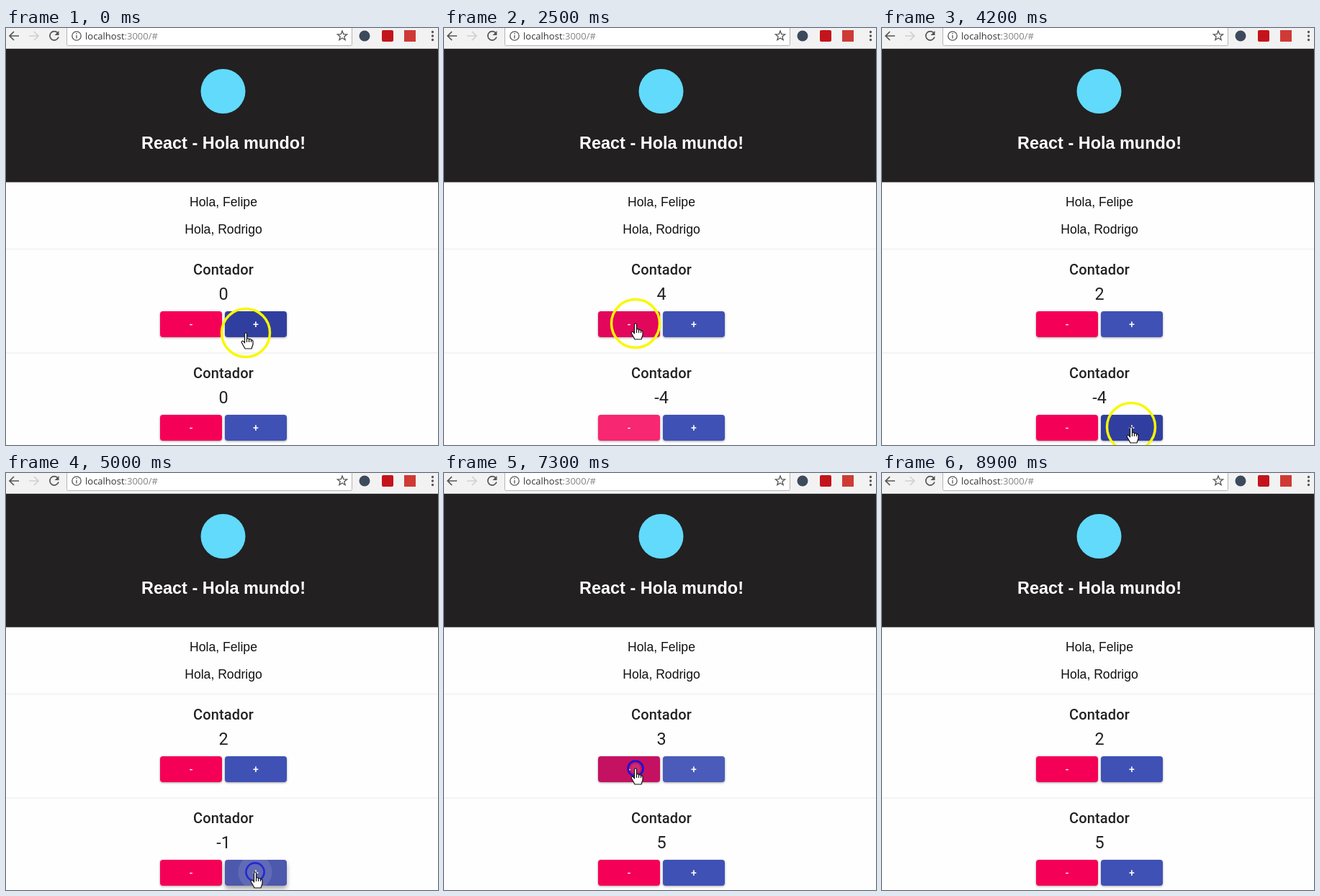
An HTML page for the animation above (9000 ms loop, 600 by 580 pixels).

```html
<!DOCTYPE html>
<html lang="es">
<head>
<meta charset="utf-8">
<title>Contador</title>
<style>
  html, body { margin: 0; width: 100%; height: 100%; overflow: hidden; background: #fefefe; }
  svg { display: block; }
  .mid { text-anchor: middle; }
  .url { font: 13px "Open Sans", sans-serif; fill: #333; }
  .title { font: bold 23.45px "Liberation Sans", Arial, sans-serif; fill: #fff; }
  .hello { font: 17.6px "Liberation Sans", Arial, sans-serif; fill: #111; }
  .name { font: 500 20px Roboto, sans-serif; letter-spacing: .15px; fill: #222; }
  .count { font: 23.4px Roboto, sans-serif; fill: #222; }
  .sign { font: 500 14px Roboto, sans-serif; fill: #fff; }
  .line { fill: none; stroke: #555; stroke-width: 1.7; }
  .thin { stroke-width: 1.3; }
</style>
</head>
<body>
<svg width="600" height="580" viewBox="0 0 600 580">
  <rect width="600" height="29" fill="#f2f2f2"/>
  <rect x="84.5" y="-4" width="396" height="28.5" rx="2" fill="#fff" stroke="#b5b5b5"/>
  <path d="M0 28.5H600" stroke="#ccc"/>
  <path class="line" d="M18 11H5M11 5L5 11L11 17"/>
  <path class="line" d="M32 11H45M39 5L45 11L39 17" style="stroke:#d0d0d0"/>
  <path class="line" d="M72 7A6.2 6.2 0 1 0 73 12.5"/>
  <path d="M73.5 4V10H67.5Z" fill="#555"/>
  <circle class="line thin" cx="98" cy="11" r="6.2"/>
  <path class="line thin" d="M98 10V14.5M98 7V8.5"/>
  <polygon class="line thin" id="star"/>
  <text class="url" x="110" y="15.5">localhost<tspan fill="#858585">:3000/#</tspan></text>
  <circle cx="498" cy="11" r="7.5" fill="#3d4a5c"/>
  <rect x="522" y="3" width="16" height="16" rx="2" fill="#c4141b"/>
  <rect x="553" y="3" width="16" height="16" fill="#cf3a35"/>
  <path d="M592.5 5.5V17" stroke="#555" stroke-width="3.4" stroke-linecap="round" stroke-dasharray="0 5.5"/>

  <rect y="29" width="600" height="185.5" fill="#222021"/>
  <circle cx="301.5" cy="88" r="31" fill="#61dafb"/>
  <text class="title mid" x="302" y="168">React - Hola mundo!</text>
  <text class="hello mid" x="302" y="248">Hola, Felipe</text>
  <text class="hello mid" x="302" y="286">Hola, Rodrigo</text>
  <path d="M0 307.5H600M0 452H600" stroke="#f4f4f6" stroke-width="2"/>

  <g id="counters"></g>

  <g id="pointer">
    <circle id="ring" fill="none"/>
    <g stroke="#111" stroke-width="1.2" stroke-linejoin="round">
      <path fill="#fff" d="M-1.5 1.5Q-1.5 0 0 0T1.5 1.5V8Q4 7 4.5 9Q7 8 7.5 10Q10 9.5 10 12V16L8 22H-1L-6 13Q-5.5 10.5-3 12L-1.5 14Z"/>
      <path fill="none" d="M1.5 8V13M4.5 9V13M7.5 10V13"/>
    </g>
  </g>
</svg>
<script>
const LOOP = 9000, STEP = 100, TRAVEL = 250, PRESS = 150, RELEASE = 180, RIPPLE = 800;
const W = 86, H = 36, ROW = 144;
const $ = id => document.getElementById(id);

// Buttons: 0 and 2 subtract, 1 and 3 add
const buttons = [0, 1, 2, 3].map(i => ({ x: 214 + i % 2 * 90, y: 394 + (i >> 1) * ROW }));
const shades = [
  { base: '#f50057', dark: '#c51162' },
  { base: '#3f51b5', dark: '#303f9f' }
];

// Runs of evenly spaced clicks
const bursts = [
  { button: 1, first: 250, gap: 250, count: 4 },
  { button: 2, first: 1650, gap: 165, count: 4 },
  { button: 0, first: 3150, gap: 300, count: 2 },
  { button: 3, first: 4440, gap: 250, count: 9 },
  { button: 1, first: 6800, gap: 0, count: 1 },
  { button: 0, first: 7400, gap: 0, count: 1 }
];
const clicks = bursts.flatMap(({ button, first, gap, count }) =>
  Array.from({ length: count }, (_, k) => ({ button, time: first + k * gap })));

// The pointer rests on a button for its burst, then glides to the next
const stops = [
  { x: 333, y: 424, leave: 0 },
  ...bursts.map(({ button, first, gap, count }) => ({
    x: buttons[button].x + (button % 2 ? 42 : 52),
    y: buttons[button].y + 17,
    leave: first + (count - 1) * gap + 100
  })),
  { x: 356, y: 625, leave: LOOP }
];

function set(id, attrs) {
  for (const key in attrs) $(id).setAttribute(key, attrs[key]);
}

function pointerAt(t) {
  const i = stops.findIndex(s => s.leave >= t);
  if (i < 1) return stops[0];
  const from = stops[i - 1], to = stops[i];
  const u = Math.min(1, (t - from.leave) / TRAVEL), ease = u * u * (3 - 2 * u);
  return { x: from.x + (to.x - from.x) * ease, y: from.y + (to.y - from.y) * ease };
}

function isOver(button, t) {
  const { x, y } = pointerAt(t);
  return Math.abs(x - button.x - W / 2) < W / 2 && Math.abs(y - button.y - H / 2) < H / 2;
}

function rippleMarkup({ time }) {
  const { x, y } = pointerAt(time);
  return age => `<circle cx="${x}" cy="${y}" r="${6 + (age / 50) ** 2}" fill="#fff"
    opacity="${.11 * Math.min(1, (RIPPLE - age) / 300)}"/>`;
}

function drawButton(button, i, t) {
  // Averaging recent hover states gives the colour fade
  const hover = [0, 50, 100, 150, 200].filter(lag => isOver(button, t - lag)).length / 5;
  const { base, dark } = shades[i % 2];
  const own = clicks.filter(c => c.button === i);
  const raised = own.some(c => t > c.time - 80 && t < c.time + 90);
  set('button' + i, {
    style: `fill:color-mix(in srgb, ${dark} ${hover * 100}%, ${base});
      filter:drop-shadow(0 ${raised ? '4px 3px' : '1.5px 1.5px'} rgba(0,0,0,.35))`
  });
  $('ripples' + i).innerHTML = own.map(c => {
    const age = t - c.time + PRESS;
    return age >= 0 && age < RIPPLE ? rippleMarkup(c)(age) : '';
  }).join('');
}

function drawPointer(t) {
  const { x, y } = pointerAt(t);
  set('pointer', { transform: `translate(${x} ${y})` });
  const click = clicks.find(c => t > c.time - PRESS && t < c.time + RELEASE);
  const age = click ? Math.max(0, t - click.time) : 0;
  set('ring', click
    ? { r: 10.5 + age * .035, stroke: '#1414d8', 'stroke-width': 2.6, opacity: 1 - age / 250 }
    : { r: 33.5, stroke: '#f8f800', 'stroke-width': 3.5, opacity: 1 });
}

function draw(now) {
  const t = Math.floor(now % LOOP / STEP) * STEP;
  for (const row of [0, 1]) {
    $('count' + row).textContent = clicks
      .filter(c => c.button >> 1 === row && c.time <= t)
      .reduce((sum, c) => sum + (c.button % 2 ? 1 : -1), 0);
  }
  buttons.forEach((button, i) => drawButton(button, i, t));
  drawPointer(t);
}

const starPoints = Array.from({ length: 10 }, (_, k) => {
  const r = k % 2 ? 3 : 7, a = (k / 5 - .5) * Math.PI;
  return [467 + r * Math.cos(a), 11 + r * Math.sin(a)];
});
set('star', { points: starPoints.join(' ') });

$('counters').innerHTML = [0, 1].map(row => `
  <text class="name mid" x="302" y="${343 + row * ROW}">Contador</text>
  <text class="count mid" id="count${row}" x="302" y="${378 + row * ROW}"></text>`).join('') +
  buttons.map(({ x, y }, i) => `
  <clipPath id="clip${i}"><rect x="${x}" y="${y}" width="${W}" height="${H}" rx="4"/></clipPath>
  <rect id="button${i}" x="${x}" y="${y}" width="${W}" height="${H}" rx="4"/>
  <text class="sign mid" x="${x + W / 2}" y="${y + 23}">${i % 2 ? '+' : '-'}</text>
  <g id="ripples${i}" clip-path="url(#clip${i})"></g>`).join('');

const start = performance.now();
function tick() {
  draw(performance.now() - start);
  requestAnimationFrame(tick);
}
tick();
</script>
</body>
</html>
```
